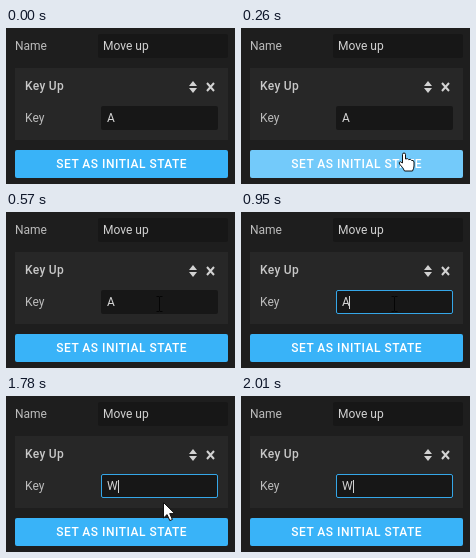
Write an HTML page that moves like this. It is 229x156 px and loops after 2390 ms.

```html
<!DOCTYPE html>
<html lang="en">
<head>
<meta charset="utf-8">
<title>Key binding form</title>
<style>
  html, body { margin: 0; width: 100%; height: 100%; overflow: hidden; background: #1e1e1e; }
  svg { display: block; width: 100vw; height: 100vh; }
  text { font: 12px Roboto, sans-serif; fill: #bcbcbc; white-space: pre; }
  .value { fill: #d2d2d2; }
  .title { font-weight: 500; letter-spacing: .3px; fill: #c8c8c8; }
  .action { font-weight: 500; letter-spacing: .5px; fill: #fff; text-anchor: middle; }
  .well { fill: #171717; }
  .icon { fill: #d2d2d2; }
  .pointer { fill: #fff; stroke: #111; stroke-linejoin: round; }
</style>
</head>
<body>
<svg viewBox="0 0 229 156">
  <rect width="229" height="156" fill="#1e1e1e"/>

  <text x="9" y="22">Name</text>
  <rect class="well" x="92" y="6" width="130" height="24" rx="2"/>
  <text class="value" x="97" y="22">Move up</text>

  <rect x="9" y="40" width="213" height="72" fill="#272727"/>
  <text class="title" x="19" y="62">Key Up</text>
  <path class="icon" d="M183 58l4-5 4 5zM183 60h8l-4 5z"/>
  <path d="M201 55l7 8M208 55l-7 8" stroke="#d2d2d2" stroke-width="2"/>

  <text x="19" y="94">Key</text>
  <rect class="well" x="95" y="78" width="117" height="24" rx="2"/>
  <rect id="focus" x="95.5" y="78.5" width="116" height="23" rx="1.5" fill="none" stroke="#35a7e8"/>
  <text id="key" class="value" x="101" y="94">A</text>
  <rect id="caret" y="84" width="1" height="13" fill="#d2d2d2"/>

  <rect id="button" x="9" y="122" width="213" height="28" rx="2"/>
  <text class="action" x="115.7" y="140">SET AS INITIAL STATE</text>

  <g id="arrow"><path class="pointer" d="M.5 .5v15.5l3.6-3.4 2.7 6 2.6-1.1-2.7-5.9h5z"/></g>
  <g id="hand"><path class="pointer" d="M-1.5 10V1.5q0-1.5 1.5-1.5t1.5 1.5V6q2.5-1 3 .6 2.4-.8 3 .8 2.3-.4 2.5 1.6v4q0 2-1.5 5h-8q-1-3-5-7-1-2 1-2.2z"/></g>
  <g id="beam"><path d="M-3 -7.5h2.5l.5 .5 .5 -.5h2.5M0 -7v14M-3 7.5h2.5l.5 -.5 .5 .5h2.5" fill="none" stroke="#050505"/></g>
</svg>
<script>
  const LOOP = 2390;
  const $ = id => document.getElementById(id);
  const pointers = ['arrow', 'hand', 'beam'];

  // start, pointer, x, y
  const moves = [
    [0], [180, 'hand', 174, 148], [260, 'hand', 163, 125],
    [340, 'arrow', 158, 109], [410, 'beam', 155, 97],
    [490, 'beam', 153.5, 93], [570, 'beam', 153.5, 92],
    [1700, 'beam', 154.5, 95], [1780, 'arrow', 157, 106],
    [1850, 'hand', 172, 128], [1930, 'hand', 188, 149], [2010]
  ];

  const show = (el, on) => el.setAttribute('visibility', on ? 'visible' : 'hidden');

  function draw(t) {
    const [, kind, x, y] = moves.findLast(m => m[0] <= t);
    for (const id of pointers) {
      show($(id), id === kind);
      if (id === kind) $(id).setAttribute('transform', `translate(${x} ${y})`);
    }

    const focused = t >= 950;
    const typed = t >= 1320;
    const blinkOff = t >= 1930 && t < 2010;
    show($('focus'), focused);
    show($('caret'), focused && !blinkOff);
    $('key').textContent = typed ? 'W' : 'A';
    $('caret').setAttribute('x', typed ? 112 : 108);
    $('button').setAttribute('fill', kind === 'hand' ? '#73cafa' : '#39b3f8');
  }

  const start = performance.now();
  function tick() {
    draw((performance.now() - start) % LOOP);
    requestAnimationFrame(tick);
  }
  tick();
</script>
</body>
</html>
```
